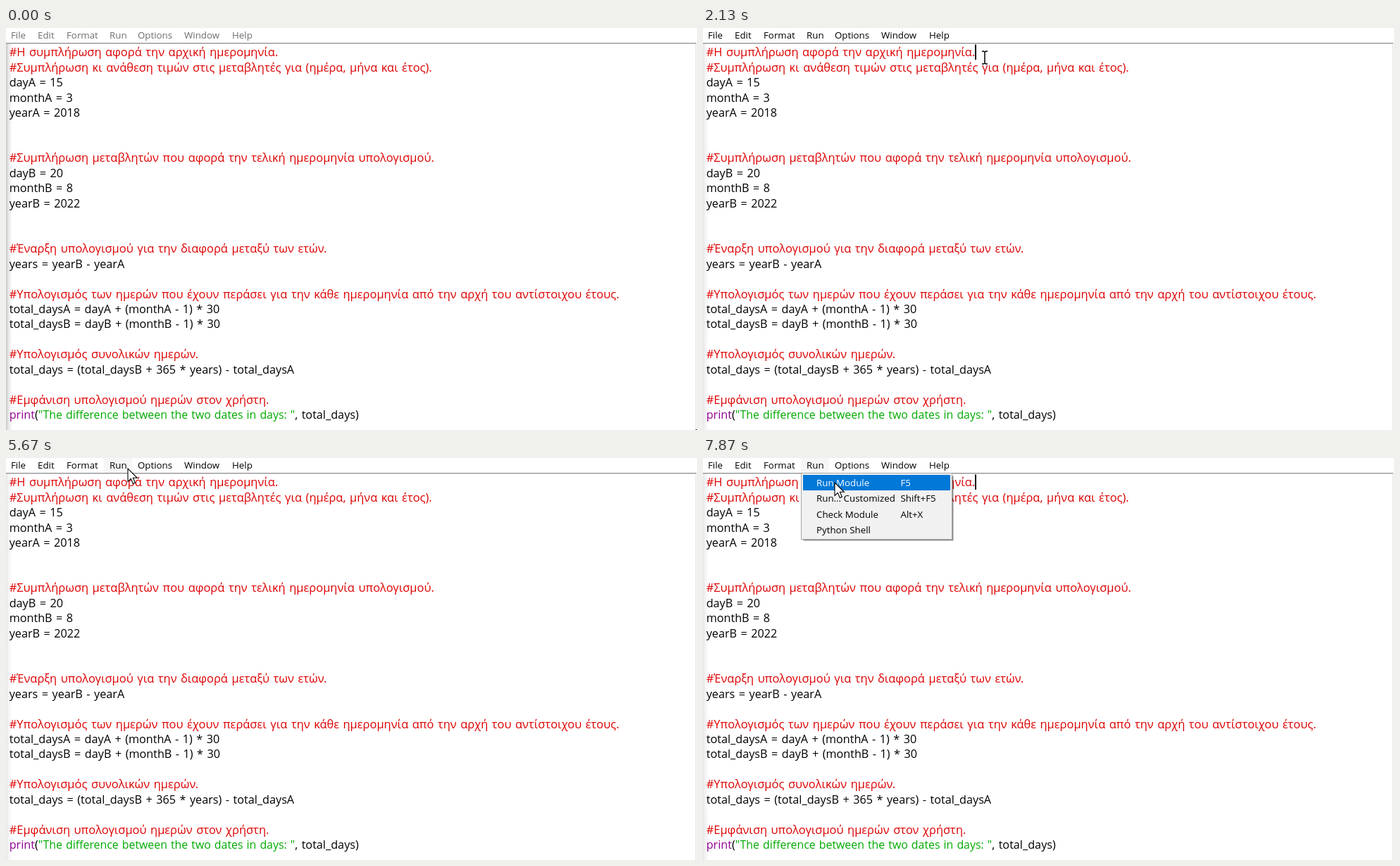
Write an HTML page that moves like this. It is 981 px wide and 571 px high and loops after 8000 ms.

```html
<!DOCTYPE html>
<html lang="el">
<head>
<meta charset="utf-8">
<title>Date difference</title>
<style>
  html, body { margin: 0; width: 100%; height: 100%; overflow: hidden; background: #fff; }
  svg { display: block; }
  text { font-family: "Open Sans", "Noto Sans", sans-serif; white-space: pre; }
  .code { font-size: 16.2px; word-spacing: 1.3px; fill: #000; }
  .comment { font-size: 16.43px; fill: #d00; }
  .keyword { fill: #900090; }
  .string { font-size: 15.9px; word-spacing: .9px; fill: #0a0; }
  .menu { font-size: 13.3px; }
</style>
</head>
<body>
<svg width="981" height="571" viewBox="0 0 981 571">
  <defs>
    <linearGradient id="edge">
      <stop offset="0" stop-color="#000" stop-opacity=".22"/>
      <stop offset=".4" stop-color="#000" stop-opacity=".09"/>
      <stop offset="1" stop-color="#000" stop-opacity="0"/>
    </linearGradient>
  </defs>
  <rect width="981" height="571" fill="#fff"/>
  <rect id="shade" y="22" width="9" height="549" fill="url(#edge)"/>
  <rect y="21" width="980" height="1.4" fill="#949494"/>
  <rect x="979" y="22" width="1" height="549" fill="#dedede"/>
  <g id="code"></g>
  <rect id="caret" x="386" y="23.5" width="2" height="21.5"/>
  <rect id="hover" x="139" width="40" height="21" fill="#f6f6f6"/>
  <g id="menuBar"></g>
  <g id="popup">
    <rect x="143" y="26" width="213" height="92" fill="#000" opacity=".18"/>
    <rect x="142" y="25" width="213" height="92" fill="#000" opacity=".35"/>
    <rect x="139.5" y="21.5" width="214" height="94" fill="#f1f1f1" stroke="#a5a5a5"/>
    <rect id="selection" x="142" y="24" width="209" height="22" fill="#0078d7"/>
    <g id="items"></g>
  </g>
  <path id="ibeam" d="M-4-9h2.5L0-8l1.5-1H4M0-8V8M-4 9h2.5L0 8l1.5 1H4" fill="none" stroke="#000" stroke-width="1.5"/>
  <path id="arrow" d="M0 0V18.5L4.3 14.4L7.3 21.5L10.4 20.2L7.4 13.3H13.3Z" fill="#fff" stroke="#000" stroke-width="1.1"/>
</svg>
<script>
const LOOP = 8000, STEP = 1000 / 15;
const $ = id => document.getElementById(id);

const source = `#Η συμπλήρωση αφορά την αρχική ημερομηνία.
#Συμπλήρωση κι ανάθεση τιμών στις μεταβλητές για (ημέρα, μήνα και έτος).
dayA = 15
monthA = 3
yearA = 2018


#Συμπλήρωση μεταβλητών που αφορά την τελική ημερομηνία υπολογισμού.
dayB = 20
monthB = 8
yearB = 2022


#Έναρξη υπολογισμού για την διαφορά μεταξύ των ετών.
years = yearB - yearA

#Υπολογισμός των ημερών που έχουν περάσει για την κάθε ημερομηνία από την αρχή του αντίστοιχου έτους.
total_daysA = dayA + (monthA - 1) * 30
total_daysB = dayB + (monthB - 1) * 30

#Υπολογισμός συνολικών ημερών.
total_days = (total_daysB + 365 * years) - total_daysA

#Εμφάνιση υπολογισμού ημερών στον χρήστη.
print("The difference between the two dates in days: ", total_days)`;

function svg(name, parent, attrs, content = "") {
  const node = document.createElementNS("http://www.w3.org/2000/svg", name);
  for (const key in attrs) node.setAttribute(key, attrs[key]);
  node.textContent = content;
  return parent.appendChild(node);
}

function tokenClass(token) {
  if (token[0] === "#") return "comment";
  if (token[0] === '"') return "string";
  return token === "print" ? "keyword" : "";
}

source.split("\n").forEach((line, row) => {
  const text = svg("text", $("code"), { class: "code", x: 4.7, y: 40.2 + row * 21.46 });
  for (const token of line.split(/(^#.*|"[^"]*"|\bprint\b)/).filter(Boolean))
    svg("tspan", text, { class: tokenClass(token) }, token);
});

const label = (parent, x, y, content) => svg("text", $(parent), { class: "menu", x, y }, content);

[["File", 7], ["Edit", 45], ["Format", 86], ["Run", 147], ["Options", 187], ["Window", 253], ["Help", 321]]
  .forEach(([name, x]) => label("menuBar", x, 15, name));

const items = [["Run Module", "F5"], ["Run... Customized", "Shift+F5"], ["Check Module", "Alt+X"], ["Python Shell", ""]]
  .map((cells, row) => cells.map((cell, column) => label("items", 161 + column * 119.5, 40 + row * 22.4, cell)));

// Pointer keys: time, x, y
const path = [
  [0, 983, 580], [330, 983, 580], [670, 640, 300], [930, 455, 190], [1200, 545, 149], [1270, 545, 149],
  [1600, 393, 72], [1670, 393, 72], [1930, 400, 42], [2600, 400, 42], [3270, 213.5, 119], [3930, 213.5, 119],
  [4200, 484, 115], [4930, 484, 115], [5200, 220.5, 65.5], [5470, 153, 6], [5670, 173, 15], [5800, 172, 15],
  [5870, 169.5, 14], [6800, 169.5, 14], [7070, 187, 35], [LOOP, 187, 35]
];
const caretToggles = [2070, 2670, 3030, 3670, 4000, 4670, 5000, 5600, 5930, 6530, 6870, 7470, 7870];
const FOCUS = 2070, MENU_OPEN = 6400;

function pointerAt(time) {
  const next = path.findIndex(key => key[0] > time);
  const [t0, x0, y0] = path[next - 1], [t1, x1, y1] = path[next];
  const k = (time - t0) / (t1 - t0);
  return [x0 + (x1 - x0) * k, y0 + (y1 - y0) * k];
}

const show = (id, visible) => $(id).setAttribute("visibility", visible ? "visible" : "hidden");

function draw(time) {
  const [x, y] = pointerAt(time);
  const focused = time >= FOCUS;
  const menuOpen = time >= MENU_OPEN;
  const overBar = y < 22;
  const selected = menuOpen && y > 24;

  $("menuBar").setAttribute("fill", focused ? "#000" : "#6d6d6d");
  $("shade").setAttribute("opacity", focused ? 0.45 : 1);
  show("caret", caretToggles.filter(t => t <= time).length % 2);
  show("hover", menuOpen || (overBar && x > 139 && x < 179));

  $("popup").setAttribute("opacity", menuOpen ? Math.min(1, (time - 6340) / 225) : 0);
  show("selection", selected);
  items[0].forEach(cell => cell.setAttribute("fill", selected ? "#fff" : "#000"));

  const isArrow = menuOpen || overBar;
  show("arrow", isArrow);
  show("ibeam", !isArrow);
  $(isArrow ? "arrow" : "ibeam").setAttribute("transform", `translate(${x} ${y})`);
}

// Hold each pose for one step; step times are rounded to 10 ms like the keys above.
const start = performance.now();
function tick() {
  const elapsed = (performance.now() - start + 4) % LOOP;
  draw(Math.round(Math.floor(elapsed / STEP) * STEP / 10) * 10);
  requestAnimationFrame(tick);
}
tick();
</script>
</body>
</html>
```
